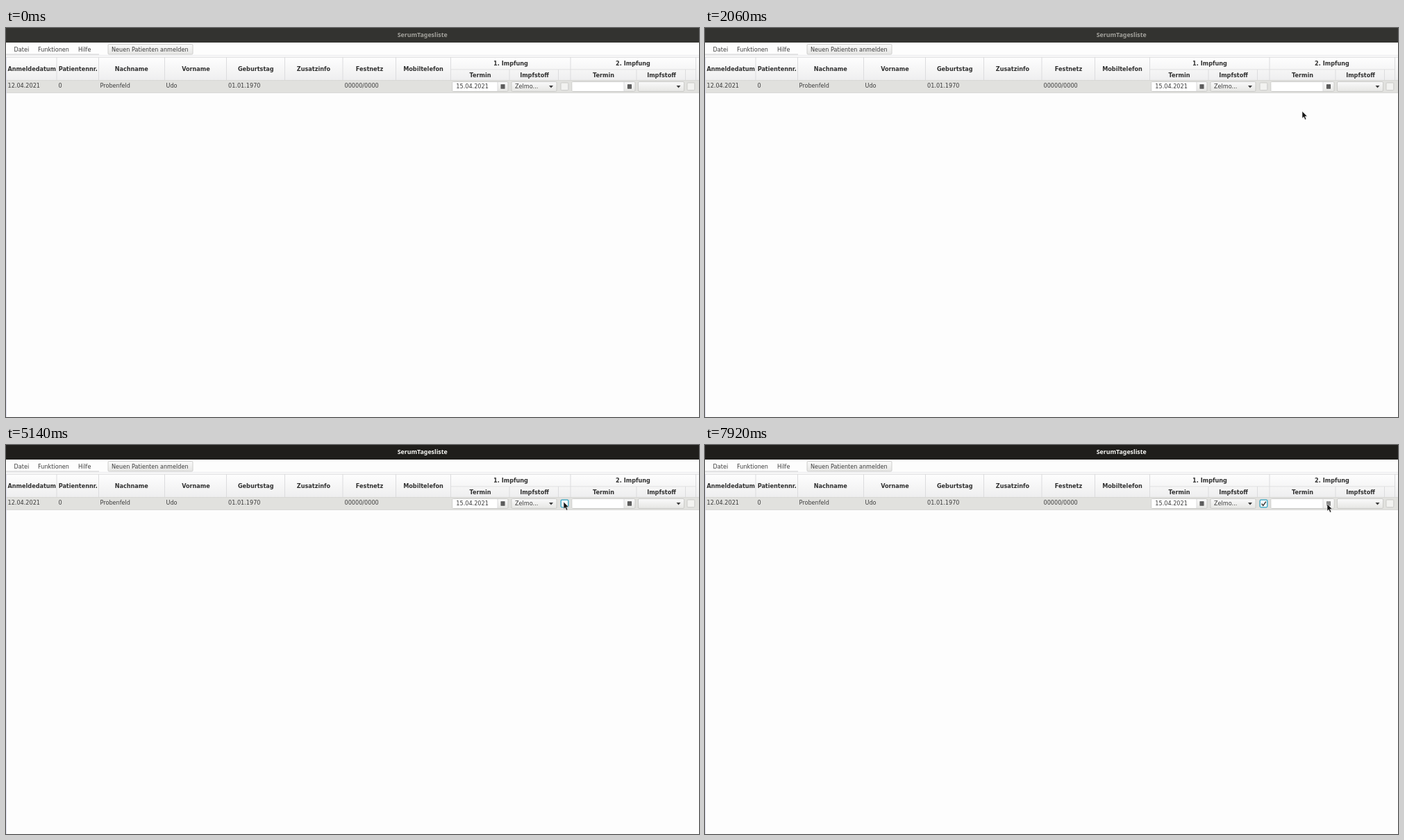
Write an HTML page that moves like this. It is 998 px wide and 561 px high and loops after 8000 ms.

```html
<!DOCTYPE html>
<html lang="de">
<head>
<meta charset="utf-8">
<title>Terminliste</title>
<style>
html, body { margin: 0; width: 100%; height: 100%; overflow: hidden; background: #fdfdfd; }
svg { display: block; width: 100%; height: 100%; }
text { font: 8.15px "DejaVu Sans", sans-serif; fill: #3c3c3c; white-space: pre; }
.bold { font-weight: bold; fill: #303030; text-anchor: middle; }
#title { font: bold 8.8px "Noto Sans", sans-serif; text-anchor: middle; }
</style>
</head>
<body>
<svg viewBox="0 0 998 561">
  <defs>
    <linearGradient id="head" x2="0" y2="1"><stop stop-color="#fefefe"/><stop offset="1" stop-color="#eeeeef"/></linearGradient>
    <linearGradient id="button" x2="0" y2="1"><stop stop-color="#fafafa"/><stop offset="1" stop-color="#e6e6e4"/></linearGradient>
  </defs>
  <rect width="998" height="561" fill="#fdfdfd"/>
  <rect id="bar" width="998" height="21"/>
  <text id="title" x="599.7" y="13">SerumTagesliste</text>
  <g id="ui"></g>
  <g id="overlay">
    <rect id="comboHover" x="728" y="77.5" width="65" height="14" fill="#fff" opacity=".35"/>
    <rect id="dateHover" x="891" y="78" width="15" height="13" fill="#fff" opacity=".3"/>
    <rect id="boxHover" x="799" y="79" width="11" height="11" rx="1.5" fill="#f0f0ee" stroke="#d8d8d6" stroke-width=".6"/>
    <rect id="focus" x="799.2" y="79.2" width="10.6" height="10.6" rx="1.5" fill="#f6f8f8" stroke="#35a9c9" stroke-width="1.3"/>
    <path id="check" d="M801.6 84.6l2.2 2.7 4-5.7" fill="none" stroke="#303030" stroke-width="1.4"/>
  </g>
  <path id="arrow" d="M0 0V10.2L2.3 8.2 4.1 12.2 5.9 11.4 4.2 7.5H7.3Z" fill="#151515" stroke="#f4f4f4" stroke-width=".6"/>
  <path id="beam" d="M-2.5-5.5H-.5L0-5 .5-5.5H2.5M0-5V5M-2.5 5.5H-.5L0 5 .5 5.5H2.5" fill="none" stroke="#222" stroke-width="1"/>
</svg>
<script>
const $ = id => document.getElementById(id);
let markup = "";
const rect = (x, y, w, h, fill, extra = "") =>
  markup += `<rect x="${x}" y="${y}" width="${w}" height="${h}" fill="${fill}" ${extra}/>`;
const label = (text, x, y, bold) =>
  markup += `<text x="${x}" y="${y}" ${bold ? 'class="bold"' : ""}>${text}</text>`;
const outlined = (x, y, w, h, fill) =>
  rect(x, y, w, h, fill, 'rx="1.5" stroke="#c4c4c2" stroke-width=".8"');
const divider = (x, y, h) => rect(x - .5, y, 1, h, "#dcdcde");

function datePicker(x, split, right, text) {
  outlined(x, 77.5, right - x, 14, "url(#button)");
  rect(x + .5, 78, split - x - .5, 13, "#fff");
  divider(split, 78, 13);
  const iconX = (split + right) / 2 - 3;
  rect(iconX, 81.3, 6, 6.3, "#494949");
  for (const y of [83.3, 85.3])
    for (const dx of [.9, 2.6, 4.3]) rect(iconX + dx, y, .8, .8, "#b5b5b5");
  label(text, x + 5.5, 87.4);
}

function combo(x, right, text) {
  outlined(x, 77.5, right - x, 14, "url(#button)");
  label(text, x + 5, 87.4);
  markup += `<path d="M${right - 11} 83h6l-3 3.4z" fill="#3c3c3c"/>`;
}

// Menu bar
["Datei", "Funktionen", "Hilfe"].forEach((name, i) => label(name, [11.5, 46, 104][i], 33.6));
rect(0, 37.6, 134, .9, "#c6c6c6");
outlined(147, 23.5, 122, 14.5, "url(#button)");
label("Neuen Patienten anmelden", 152, 33.6);
rect(0, 38.9, 998, .7, "#e2e2e4");

// Table
rect(0, 42, 998, 33.5, "url(#head)");
rect(0, 41.7, 998, .8, "#cfcfd1");
rect(0, 75, 998, 18.6, "#e1e1de");
rect(0, 75, 998, .6, "#d2d2d0");
rect(0, 93, 998, .7, "#d2d2d0");
rect(0, 42, .8, 519, "#d9d9ec");
[73, 133.5, 228.5, 317.5, 401.5, 485, 561.5, 640.5, 813, 993.5].forEach(x => divider(x, 42, 33));
[725, 795.5, 908, 978.5].forEach(x => divider(x, 60, 15));
rect(641, 59.5, 352, .8, "#dcdcde");
[["Anmeldedatum", 37.3], ["Patientennr.", 103.7], ["Nachname", 180.7], ["Vorname", 273.5],
 ["Geburtstag", 359.8], ["Zusatzinfo", 443], ["Festnetz", 523.5], ["Mobiltelefon", 601]]
  .forEach(([name, x]) => label(name, x, 62.4, true));
[["1. Impfung", 727, 54.2], ["2. Impfung", 903, 54.2], ["Termin", 683, 70.8], ["Impfstoff", 761, 70.8],
 ["Termin", 860.5, 70.8], ["Impfstoff", 944, 70.8]].forEach(([name, x, y]) => label(name, x, y, true));
[["12.04.2021", 2.5], ["0", 75.5], ["Probenfeld", 135.5], ["Udo", 230.5], ["01.01.1970", 320], ["00000/0000", 487.5]]
  .forEach(([value, x]) => label(value, x, 85.7));
datePicker(642.8, 708, 723, "15.04.2021");
combo(728, 793, "Zelmo...");
outlined(799, 79, 10.8, 10.8, "#f2f2f0");
datePicker(815, 890, 906, "");
combo(910.5, 976.5, "");
outlined(981, 79, 10.8, 10.8, "#f2f2f0");
$("ui").innerHTML = markup;

// Pointer path: time, x, y
const path = [
  [0, 998, 229], [480, 998, 229], [1220, 943, 170], [1300, 943, 170], [1360, 936, 163], [1440, 936, 163],
  [2060, 860, 120], [2140, 860, 120], [2860, 815, 97], [2900, 806, 93], [2980, 806, 93],
  [3300, 786, 85], [3580, 786, 85], [4020, 803, 82], [5940, 803, 82],
  [6220, 869, 89], [6340, 869, 89], [6780, 898, 89], [7060, 903, 89],
  [7600, 903, 89], [7920, 896, 85], [8000, 896, 85]
];

function pointerAt(time) {
  const t = Math.floor(time / 20) * 20;
  const i = path.findIndex(point => point[0] > t);
  const [t0, x0, y0] = path[i - 1], [t1, x1, y1] = path[i];
  const p = (t - t0) / (t1 - t0);
  return [x0 + (x1 - x0) * p, y0 + (y1 - y0) * p];
}

const show = (id, visible) => $(id).style.display = visible ? "" : "none";

function draw(now) {
  const t = now % 8000;
  const active = t >= 5140;
  const [x, y] = pointerAt(t);
  const inRow = y >= 77 && y <= 91;
  const overText = inRow && x >= 816 && x < 890;
  $("bar").setAttribute("fill", active ? "#1f1e1b" : "#333330");
  $("title").style.fill = active ? "#f7f7f4" : "#a3a29c";
  show("comboHover", inRow && x >= 728 && x <= 793);
  show("dateHover", inRow && x >= 815 && x <= 906);
  show("boxHover", !active && inRow && x >= 799 && x <= 810);
  show("focus", active);
  show("check", t >= 5520);
  show("arrow", t >= 500 && !overText);
  show("beam", overText);
  for (const id of ["arrow", "beam"]) $(id).setAttribute("transform", `translate(${x} ${y})`);
}

function loop() {
  draw(performance.now());
  requestAnimationFrame(loop);
}
loop();
</script>
</body>
</html>
```
